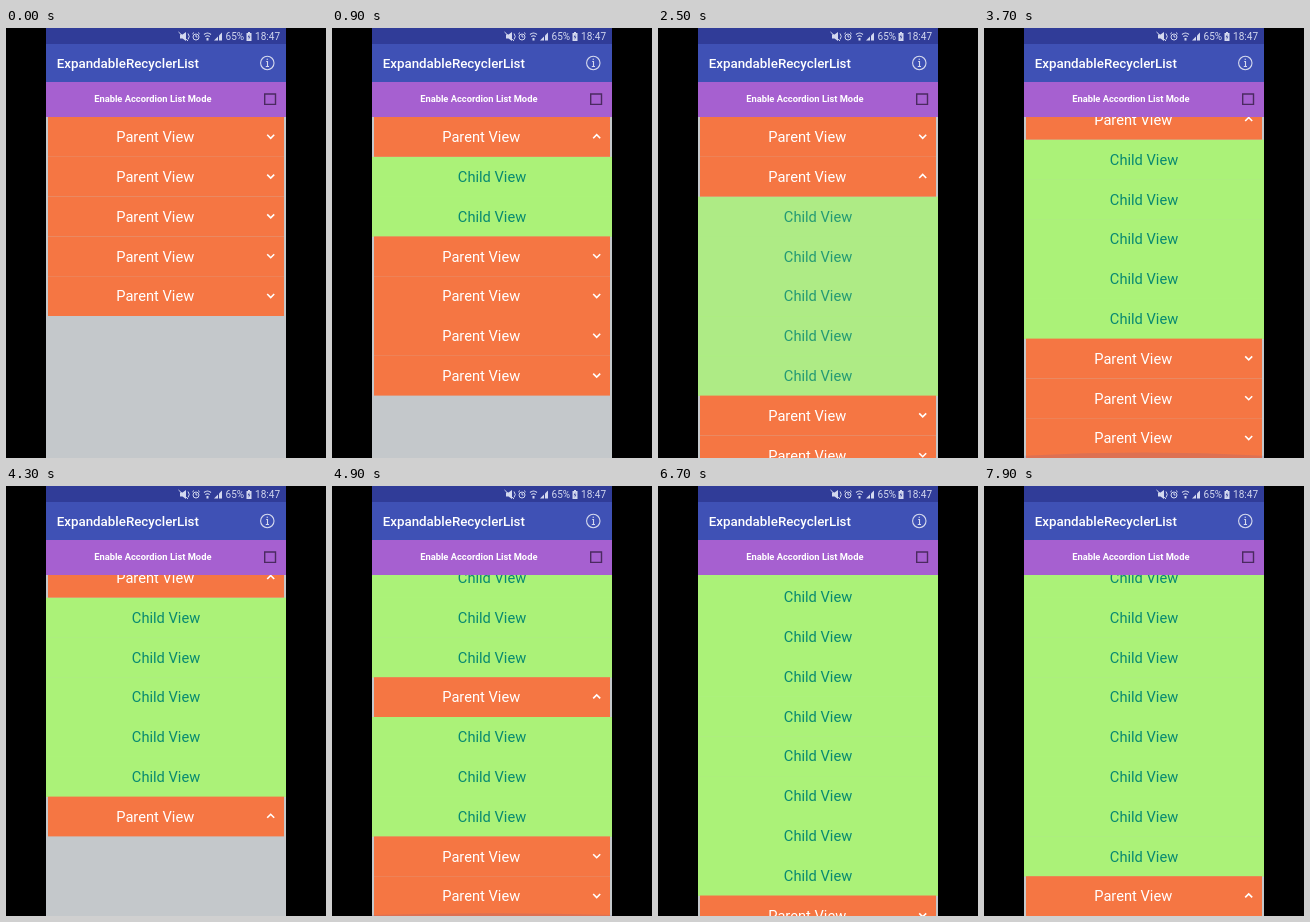
Write an HTML page with a canvas that moves like this. It is 320 px wide and 430 px high and loops after 8 s.

```html
<!DOCTYPE html>
<html lang="en">
<head>
<meta charset="utf-8">
<title>Expandable list</title>
<style>
html, body { margin: 0; height: 100%; overflow: hidden; background: #000; }
canvas { display: block; }
</style>
</head>
<body>
<canvas id="stage" width="320" height="430"></canvas>
<script>
const ctx = document.getElementById('stage').getContext('2d');
const LOOP = 8000, STEP = 100;
const LEFT = 40, RIGHT = 280, TOP = 89, BOTTOM = 430, ROW = 39.8;
const END = 23 * ROW + TOP - BOTTOM;

// Each parent row: number of children, when it opens and closes.
const parents = [
  { count: 2, open: 450, close: 1150 },
  { count: 5, open: 2150 },
  { count: 3, open: 4050 },
  { count: 10, open: 4950 },
  { count: 4, open: 7100 }
];

// Scroll moves: start time, end time, start offset, end offset, easing.
const linear = u => u;
const smooth = u => (1 - Math.cos(Math.PI * u)) / 2;
const coast = u => 1 - (1 - u) ** 1.3;
const scrolls = [
  [3200, 3600, 0, 10 * ROW + TOP - BOTTOM, smooth],
  [4450, 4850, 10 * ROW + TOP - BOTTOM, 13 * ROW + TOP - BOTTOM, smooth],
  [5300, 5500, 13 * ROW + TOP - BOTTOM, 326.5, linear],
  [5500, 6896, 326.5, END, coast]
];
const glows = [3550, 4840];

const progress = (t, start, length) => Math.min(1, Math.max(0, (t - start) / length));

function scrollAt(t) {
  let offset = 0;
  for (const [start, end, from, to, ease] of scrolls)
    if (t >= start) offset = from + (to - from) * ease(progress(t, start, end - start));
  return offset;
}

function rect(color, x, y, w, h) {
  ctx.fillStyle = color;
  ctx.fillRect(x, y, w, h);
}

function text(str, x, y, font, color, align = 'center') {
  ctx.font = font + ' Roboto, sans-serif';
  ctx.textAlign = align;
  ctx.fillStyle = color;
  ctx.fillText(str, x, y);
}

function stroke(path, color, width) {
  ctx.strokeStyle = color;
  ctx.lineWidth = width;
  ctx.stroke(new Path2D(path));
}

function fill(path, color) {
  ctx.fillStyle = color;
  ctx.fill(new Path2D(path));
}

function drawParent(y, turn) {
  rect('#f57643', 42, y, 236, ROW);
  text('Parent View', 149.2, y + ROW / 2 + 5.2, '14.67px', '#fff');
  ctx.save();
  ctx.translate(264.7, y + ROW / 2 - 0.4);
  ctx.rotate(Math.PI * turn);
  stroke('M-3.5 -1.7L0 1.8L3.5 -1.7', '#fff', 1.6);
  ctx.restore();
}

function drawChild(y, alpha) {
  ctx.globalAlpha = alpha;
  rect('#abf278', LEFT, y, RIGHT - LEFT, ROW + 0.4);
  text('Child View', 160, y + ROW / 2 + 5.2, '14.67px', '#088a70');
  ctx.globalAlpha = 1;
}

function drawList(t) {
  ctx.save();
  ctx.beginPath();
  ctx.rect(LEFT, TOP, RIGHT - LEFT, BOTTOM - TOP);
  ctx.clip();
  rect('#c4c8cb', LEFT, TOP, RIGHT - LEFT, BOTTOM - TOP);
  let y = TOP - scrollAt(t);
  const heads = [];
  for (const { count, open, close = Infinity } of parents) {
    // Opening makes room and then fades in; closing runs in reverse.
    const room = smooth(progress(t, open, 250)) - smooth(progress(t, close + 120, 250));
    const alpha = progress(t, open + 250, 120) - progress(t, close, 120);
    const turn = smooth(progress(t, open, 200)) - smooth(progress(t, close, 200));
    heads.push([y, turn]);
    y += ROW;
    if (alpha > 0)
      for (let i = 0; i < count; i++) drawChild(y + i * ROW, alpha);
    y += count * ROW * room;
  }
  for (const head of heads) drawParent(...head);
  for (const start of glows) {
    const height = 6 * Math.sin(Math.PI * progress(t, start, 400));
    if (height > 0.01)
      fill(`M40 430V${430 - height * 0.4}Q160 ${430 - height * 1.6} 280 ${430 - height * 0.4}V430Z`,
        'rgba(80,80,170,.15)');
  }
  ctx.restore();
}

function drawStatusBar() {
  const light = '#d3d8ef';
  rect('#303c98', LEFT, 0, 240, 16);
  // mute, alarm, wifi, signal, battery
  fill('M174 6.5H176.5L180 4V13L176.5 10.5H174Z', light);
  stroke('M172.5 4L182 13M182 5.5Q184.5 8.5 182 11.5', light, 1);
  stroke('M193 9A3 3 0 1 1 187 9A3 3 0 1 1 193 9M190 7V9H191.5M186.3 6L188 4.5M193.7 6L192 4.5', light, 1);
  stroke('M198 6.5Q201.5 3.5 205 6.5M199.3 8.7Q201.5 6.8 203.7 8.7', light, 1.1);
  fill('M200.5 10H202.5V12.5H200.5Z', light);
  fill('M208 12.5L212 8.5V12.5Z', light);
  fill('M213 12.5V7.5L216 4.5V12.5Z', light);
  text('65%', 219.6, 12.2, '10px', light, 'left');
  fill('M240.5 5H242V4H244V5H245.5V13H240.5Z', light);
  fill('M243.5 6L241.7 9.3H243L242.5 12L244.3 8.5H243Z', '#303c98');
  text('18:47', 274, 12.2, '10px', light, 'right');
}

function drawHeader() {
  drawStatusBar();
  rect('#3f51b5', LEFT, 16, 240, 38);
  text('ExpandableRecyclerList', 50.7, 40, '500 13.33px', '#fff', 'left');
  stroke('M268 35A6.7 6.7 0 1 1 254.6 35A6.7 6.7 0 1 1 268 35', '#d6daee', 1.1);
  stroke('M260.2 33.5H261.5V38.3M259.8 38.5H263M260.6 31.3H262', '#d6daee', 1.1);
  rect('#a660d0', LEFT, 54, 240, TOP - 54);
  text('Enable Accordion List Mode', 146.8, 74.1, 'bold 9.33px', '#fff');
  stroke('M258.7 66H269.5V76.4H258.7Z', '#4a2a60', 1.4);
}

function frame(now) {
  const t = Math.floor((now % LOOP) / STEP) * STEP;
  rect('#000', 0, 0, 320, 430);
  drawList(t);
  drawHeader();
  requestAnimationFrame(frame);
}
requestAnimationFrame(frame);
</script>
</body>
</html>
```
